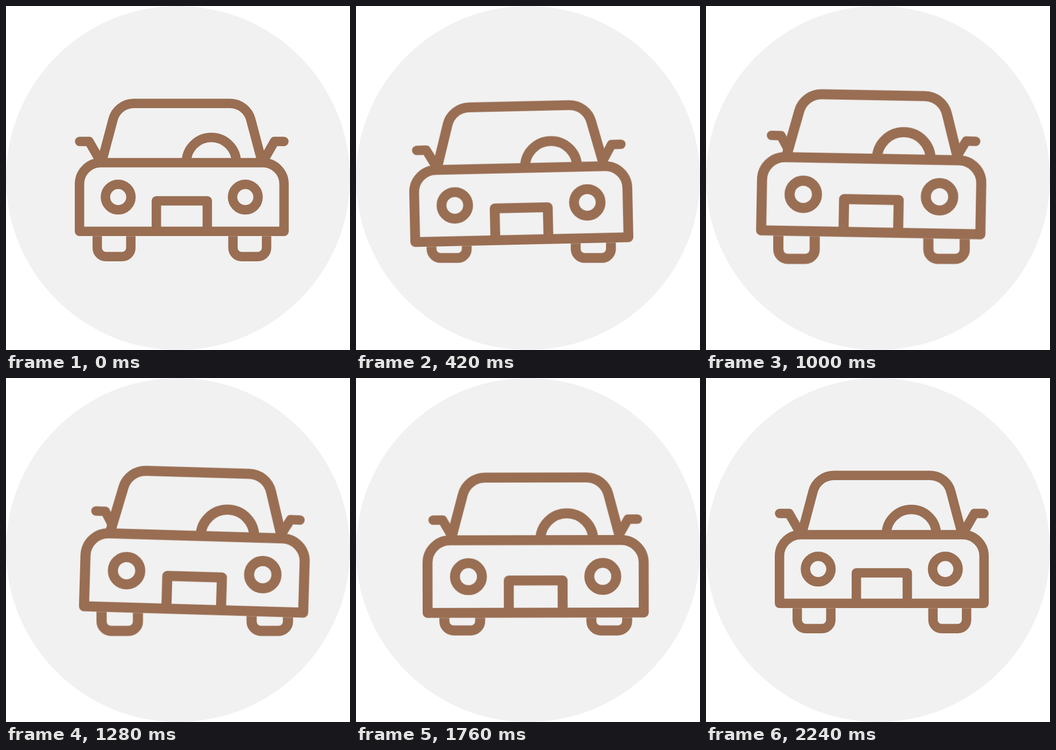
An HTML page that plays this animation: 640 px wide and 640 px high, repeating every 2.4 s.

```html
<!DOCTYPE html>
<html lang="en">
<head>
<meta charset="utf-8">
<title>Car</title>
<style>
html, body { margin: 0; width: 100%; height: 100%; overflow: hidden; background: #fff; }
svg { display: block; width: 100vw; height: 100vh; }
.car { fill: none; stroke: #996e53; stroke-width: 17.5; stroke-linejoin: round; }
.solid { fill: #f1f1f1; }
.seam { stroke: #f1f1f1; stroke-width: .7; opacity: .35; }

.car, .car g { animation: 2400ms cubic-bezier(.3333, 0, .6667, 1) infinite; }
.car { animation-name: drift; }
.car .wheel { animation-name: wheel; transform-origin: 201px 475px; --dx: -13.3px; }
.car .wheel.right { transform-origin: 453.5px 475px; --dx: 13.3px; }
.car .bounce { animation-name: bounce; }
.car .lift { animation-name: lift; }
.car .mirrors { animation-name: sway; transform-origin: 327px 392px; }
.car .tilt { animation-name: tilt; transform-origin: 327.25px 355.5px; }
.car .grow { animation-name: grow; transform-origin: 327.25px 407.5px; }

/* steering left, then right, then back to the middle */
@keyframes drift {
  0%, 4.58% { transform: translateX(0); }
  32.3% { transform: translateX(-44px); }
  55.8%, 57.7% { transform: translateX(26px); }
  81.67%, 100% { transform: translateX(0); }
}
/* suspension */
@keyframes bounce {
  0%, 5% { transform: translateY(0); }
  22.5%, 26.25% { transform: translateY(18.5px); }
  35.83% { transform: translateY(-9px); }
  48.75% { transform: translateY(14px); }
  61.67% { transform: translateY(2px); }
  72.08% { transform: translateY(17px); }
  93.33%, 100% { transform: translateY(0); }
}
@keyframes tilt {
  0%, 5% { transform: rotate(0deg); }
  16.25% { transform: rotate(-1.3deg); }
  47.9% { transform: rotate(1.3deg); }
  63.75% { transform: rotate(2.65deg); }
  79.17% { transform: rotate(-1.4deg); }
  93.33%, 100% { transform: rotate(0deg); }
}
@keyframes sway {
  0%, 5% { transform: rotate(0deg); }
  20.4% { transform: rotate(-1.9deg); }
  46.25% { transform: rotate(2deg); }
  63.75% { transform: rotate(3.5deg); }
  79.6% { transform: rotate(-2.25deg); }
  93.33%, 100% { transform: rotate(0deg); }
}
/* coming closer and going back */
@keyframes grow {
  0%, 93.33%, 100% { transform: scale(1); }
  31.25%, 65% { transform: scale(1.072); }
}
@keyframes lift {
  0%, 93.33%, 100% { transform: translateY(0); }
  31.25%, 65% { transform: translateY(-6.8px); }
}
@keyframes wheel {
  0%, 93.33%, 100% { transform: translate(0, 0) scale(1); }
  31.25%, 65% { transform: translate(var(--dx), 5px) scale(1.0825); }
}
</style>
</head>
<body>
<svg viewBox="0 0 640 640">
  <circle cx="320" cy="320" r="320" fill="#f1f1f1"/>
  <g class="car">
    <g class="wheel">
      <path d="M169.75 405V450a16.25 16.25 0 0 0 16.25 16.25h30a16.25 16.25 0 0 0 16.25-16.25V405"/>
    </g>
    <g class="wheel right">
      <path d="M422.25 405V450a16.25 16.25 0 0 0 16.25 16.25h30a16.25 16.25 0 0 0 16.25-16.25V405"/>
    </g>
    <g class="bounce">
      <g class="lift">
        <g class="mirrors" stroke-linecap="round">
          <path d="M137 252H154.5L174 286M517 252H499.5L480 286"/>
        </g>
      </g>
      <g class="tilt">
        <g class="grow">
          <path class="solid" d="M178.7 288L199 211.5A40 40 0 0 1 238 181.25H416.5A40 40 0 0 1 455.5 211.5L475.8 288"/>
          <path d="M335.5 291A46.5 46.5 0 0 1 428.5 291"/>
          <path class="solid" d="M136.75 419.25V331A39.5 39.5 0 0 1 176.25 291.5H477.75A39.5 39.5 0 0 1 517.25 331V419.25Z"/>
          <path d="M279.75 419.25V362.5H374.5V419.25"/>
          <circle cx="208.75" cy="355.5" r="23.75"/>
          <circle cx="445.25" cy="355.5" r="23.75"/>
          <path class="seam" d="M140 428.5H514"/>
        </g>
      </g>
    </g>
  </g>
</svg>
</body>
</html>
```
